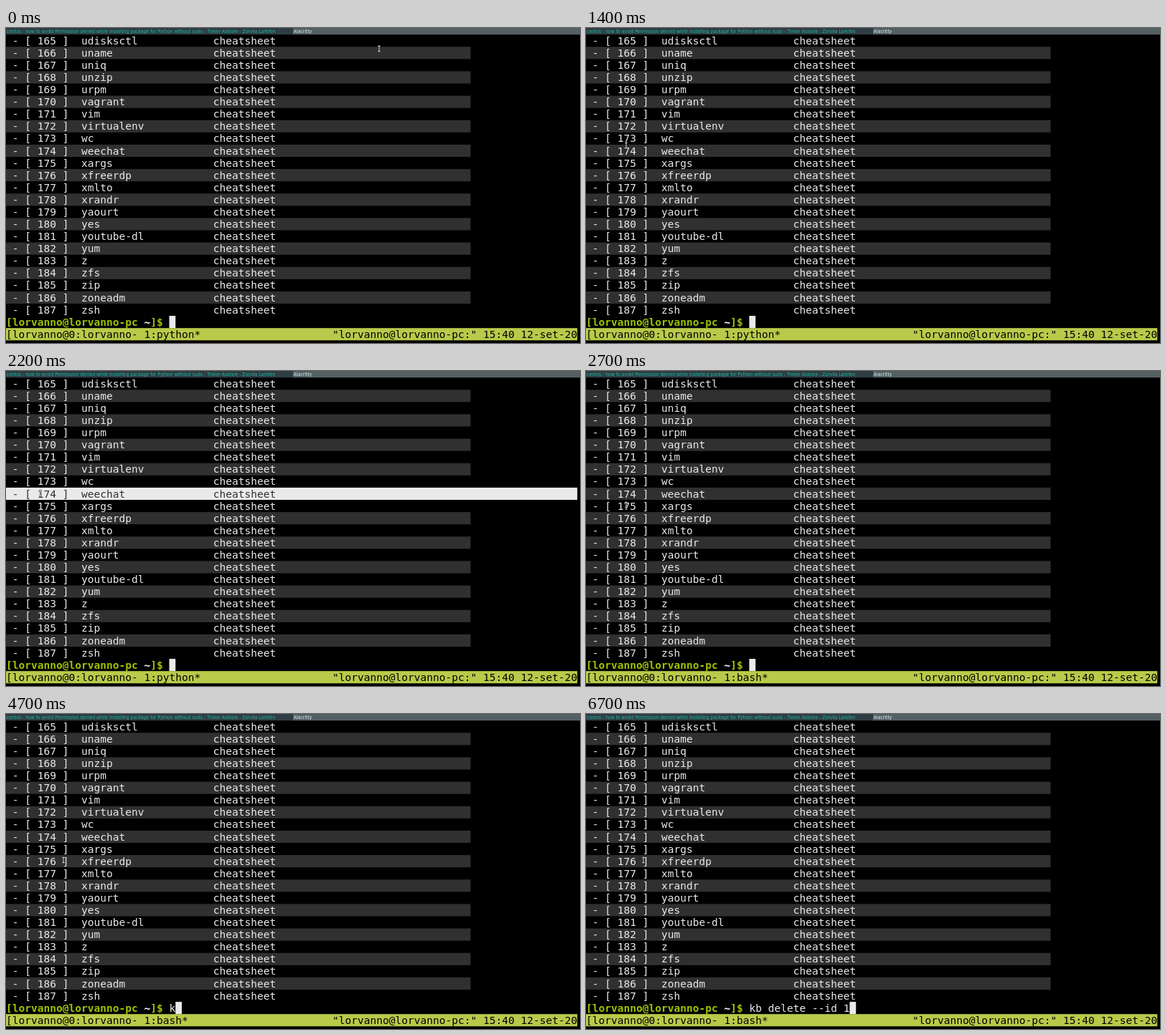
Recreate the animation shown at these times as an HTML page with a canvas. Size 800 by 440 pixels, loop 8 s.

```html
<!DOCTYPE html>
<html lang="en">
<head>
<meta charset="utf-8">
<title>Terminal</title>
<style>
  html, body { margin: 0; width: 100%; height: 100%; overflow: hidden; background: #000; }
  canvas { display: block; }
</style>
</head>
<body>
<canvas id="stage" width="800" height="440"></canvas>
<script>
const ctx = document.getElementById('stage').getContext('2d');

// The desktop is laid out in 1920 x 1056 units and scaled down to the stage.
const SCALE = 800 / 1920;
const LOOP = 8000, TICK = 100;
const CELL_W = 21, CELL_H = 41, TOP = 22, COLUMNS = 91, TABLE_COLUMNS = 74;
const BASELINE = 32.7;
const MONO = '34.88px "DejaVu Sans Mono", monospace';
const TITLE_FONT = '14.65px "DejaVu Sans", sans-serif';
const COLORS = {
  fg: '#eaeaea', bg: '#000000', stripe: '#303030', status: '#b9ca4a',
  prompt: '#9ec400', tab: '#2f3d44', tabText: '#1abc9c',
  activeTab: '#556064', activeTabText: '#d5f7f3'
};

const USER = 'lorvanno';
const HOST = USER + '-pc';
const FIRST_ID = 165;
const ENTRIES = ('udisksctl uname uniq unzip urpm vagrant vim virtualenv wc weechat xargs ' +
  'xfreerdp xmlto xrandr yaourt yes youtube-dl yum z zfs zip zoneadm zsh').split(' ');
const PROMPT_ROW = ENTRIES.length, STATUS_ROW = PROMPT_ROW + 1;

const COMMAND = 'kb delete --id 1';
const KEY_TIMES = [4700, 4800, 5000, 5100, 5300, 5400, 5500, 5700, 5700,
  5800, 5900, 6100, 6300, 6400, 6500, 6700];

// Mouse selections: a word covers the id cells, a line covers the whole width.
const SELECTIONS = [
  { from: 2000, to: 2200, id: 174, col: 5, width: 3 },
  { from: 2200, to: 2400, id: 174, col: 0, width: COLUMNS },
  { from: 3200, to: 3500, id: 175, col: 5, width: 3 },
  { from: 3700, to: 3900, id: 176, col: 5, width: 3 }
];

// time, x, y in stage pixels
const POINTER = [
  [0, 520, 29], [1000, 142, 409], [1200, 60, 139], [1300, 45, 150],
  [1400, 56, 164], [1800, 48, 171], [2400, 48, 171], [2700, 56, 187],
  [3200, 56, 188], [3500, 56, 204], [3800, 57, 205], [3900, 78, 204], [4100, 80, 204]
];

function fillCells(col, row, width, color) {
  ctx.fillStyle = color;
  ctx.fillRect(col * CELL_W, TOP + row * CELL_H, width * CELL_W, CELL_H);
}

function print(text, col, row, color = COLORS.fg, bold = false) {
  ctx.font = (bold ? 'bold ' : '') + MONO;
  ctx.fillStyle = color;
  ctx.fillText(text, col * CELL_W, TOP + row * CELL_H + BASELINE);
}

function drawTab(x, title, bg, color) {
  ctx.fillStyle = bg;
  ctx.fillRect(x, 0, 960, TOP);
  ctx.font = TITLE_FONT;
  ctx.fillStyle = color;
  ctx.fillText(title, x + 2, 16);
}

function drawEntry(row, time) {
  const id = FIRST_ID + row;
  const line = ` - [ ${id} ]  ${ENTRIES[row].padEnd(21)}cheatsheet`;
  const striped = id % 2 === 0;
  if (striped) fillCells(0, row, TABLE_COLUMNS, COLORS.stripe);
  print(line, 0, row);

  const sel = SELECTIONS.find(s => s.id === id && time >= s.from && time < s.to);
  if (!sel) return;
  fillCells(sel.col, row, sel.width, COLORS.fg);
  print(line.slice(sel.col, sel.col + sel.width), sel.col, row,
    striped ? COLORS.stripe : COLORS.bg);
}

function drawPrompt(time) {
  const userHost = `[${USER}@${HOST}`;
  const tail = userHost.length + 2;
  const start = tail + 3;
  print(userHost, 0, PROMPT_ROW, COLORS.prompt, true);
  print(' ~', userHost.length, PROMPT_ROW, '#ffffff', true);
  print(']$', tail, PROMPT_ROW, COLORS.prompt, true);

  const typed = KEY_TIMES.filter(t => t <= time).length;
  print(COMMAND.slice(0, typed), start, PROMPT_ROW);
  fillCells(start + typed, PROMPT_ROW, 1, COLORS.fg);
}

function drawStatus(time) {
  const program = time < 2500 ? 'python' : 'bash';
  const right = `"${USER}@${HOST}:" 15:40 12-set-20`;
  fillCells(0, STATUS_ROW, COLUMNS, COLORS.status);
  print(`[${USER}@0:${USER}- 1:${program}*`, 0, STATUS_ROW, COLORS.bg);
  print(right, COLUMNS - right.length, STATUS_ROW, COLORS.bg);
}

function pointerAt(time) {
  const next = POINTER.findIndex(p => p[0] > time);
  if (next < 0) return POINTER[POINTER.length - 1].slice(1);
  const [t0, x0, y0] = POINTER[next - 1], [t1, x1, y1] = POINTER[next];
  const k = (time - t0) / (t1 - t0);
  return [x0 + (x1 - x0) * k, y0 + (y1 - y0) * k];
}

function drawPointer(time) {
  const [x, y] = pointerAt(time);
  ctx.save();
  ctx.translate(x / SCALE, y / SCALE);
  ctx.beginPath();
  ctx.moveTo(-4, -9); ctx.lineTo(4, -9);
  ctx.moveTo(0, -9); ctx.lineTo(0, 9);
  ctx.moveTo(-4, 9); ctx.lineTo(4, 9);
  ctx.lineWidth = 5;
  ctx.strokeStyle = '#000000';
  ctx.stroke();
  ctx.lineWidth = 2.4;
  ctx.strokeStyle = '#ffffff';
  ctx.stroke();
  ctx.restore();
}

function draw(now) {
  const time = Math.floor((now % LOOP) / TICK) * TICK;
  ctx.setTransform(SCALE, 0, 0, SCALE, 0, 0);
  ctx.fillStyle = COLORS.bg;
  ctx.fillRect(0, 0, 1920, 1056);

  drawTab(0, 'centos - how to avoid Permission denied while installing package for Python ' +
    'without sudo - Tinker Asklore - Zorvila Larkfen', COLORS.tab, COLORS.tabText);
  drawTab(960, 'Alacritty', COLORS.activeTab, COLORS.activeTabText);

  ENTRIES.forEach((_, row) => drawEntry(row, time));
  drawPrompt(time);
  drawStatus(time);
  drawPointer(time);
}

const startTime = performance.now();
function frame() {
  draw(performance.now() - startTime);
  requestAnimationFrame(frame);
}
frame();
</script>
</body>
</html>
```
